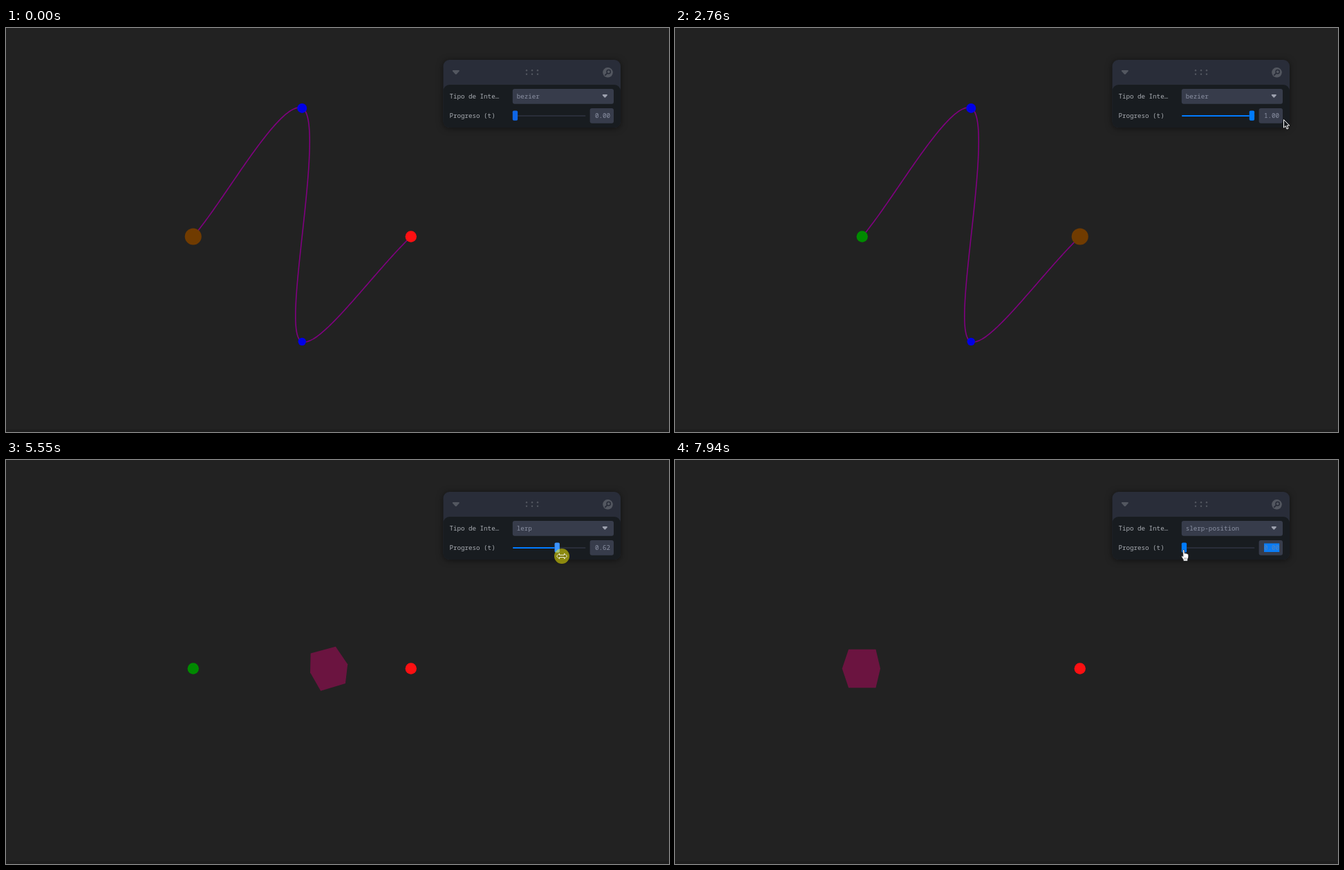
An HTML page for the animation above (8000 ms loop, 959 by 584 pixels).

```html
<!DOCTYPE html>
<html lang="es">
<head>
<meta charset="utf-8">
<title>Interpolación</title>
<style>
  html, body { margin: 0; width: 100%; height: 100%; overflow: hidden; background: #222; }
  svg { display: block; }
  text { font: 9.2px "Noto Sans Mono", "DejaVu Sans Mono", monospace; fill: #8c92a4; white-space: pre; }
  .label { fill: #a9adb3; }
  .panel { filter: drop-shadow(0 1px 5px rgba(0, 0, 0, .5)); }
</style>
</head>
<body>
<svg width="959" height="584" viewBox="0 0 959 584">
  <rect width="959" height="584" fill="#222"/>
  <rect y="580" width="959" height="4" fill="#1e1e1e"/>

  <path id="curve" fill="none" stroke="#800080" stroke-width="1.6"/>
  <g id="dots"></g>
  <circle id="ball" fill="#703b00"/>
  <polygon id="cube" fill="#6b1440"/>

  <g class="panel">
    <rect x="632.5" y="46" width="256.5" height="98" rx="9" fill="#292d39"/>
    <path d="M632.5 91a9 9 0 0 1 9-9H880a9 9 0 0 1 9 9V135a9 9 0 0 1-9 9H641.5a9 9 0 0 1-9-9Z" fill="#181c20"/>
  </g>
  <g fill="#535760">
    <path d="M646.6 61h8.4q1.4 .4 .6 1.6l-3.6 3.9q-1.200 1-2.400 0l-3.600-3.900q-.8-1.200 .6-1.600Z"/>
    <g id="grip"></g>
    <circle cx="870.5" cy="64.300" r="7.300"/>
  </g>
  <circle cx="871.700" cy="63.300" r="2.700" fill="none" stroke="#292d39" stroke-width="1.500"/>
  <path d="M869.600 65.400L866.800 68.200" stroke="#292d39" stroke-width="1.700" stroke-linecap="round"/>

  <text class="label" x="641.5" y="101.500">Tipo de Inte…</text>
  <text class="label" x="641.5" y="130">Progreso (t)</text>
  <rect x="732.800" y="88" width="146.200" height="21.700" rx="3" fill="#373c4b"/>
  <text id="mode" x="738.800" y="101.500"></text>
  <path d="M863.400 96h5.800q1.100 .4 .4 1.400l-2.400 2.900q-.9 .8-1.800 0l-2.400-2.900q-.7-1 .4-1.400Z" fill="#9da1ae"/>

  <rect x="733" y="126" width="105.500" height="2" rx="1" fill="#292d39"/>
  <rect id="fill" x="733" y="126" height="2" rx="1" fill="#007bff"/>
  <rect id="handle" y="119.500" width="7.300" height="14.200" rx="1.800"/>
  <rect x="844.600" y="116" width="34.400" height="21.700" rx="3" fill="#373c4b"/>
  <rect id="selection" x="852" y="120.500" width="22.200" height="12.500" fill="#0a7cf5"/>
  <text id="value" x="852" y="130"></text>

  <g id="arrow">
    <path d="M.5 .5V12L3.200 9.600L5 14L7 13.200L5.200 9H8.800Z" fill="#16191c" stroke="#fff" stroke-linejoin="round"/>
  </g>
  <g id="hand">
    <path d="M-1 .3Q.2-1 1.200 .3L1.700 5L3.400 4.800L5.200 5.500L6.900 6.300Q7.700 9 6.800 11.500L6 13V16H-.2V14L-2.600 10.200Q-3.200 8.300-1.600 8.500L-.5 9.600Z" fill="#fff" stroke="#16191c" stroke-width=".6"/>
    <path d="M1.700 11V14M3.700 11V14" stroke="#555" stroke-width=".6"/>
  </g>
  <g id="drag">
    <circle r="11" fill="#fff800" fill-opacity=".5"/>
    <path d="M-7.500 0L-3.500-3.800V-1.500H3.500V-3.800L7.500 0L3.500 3.800V1.500H-3.500V3.800Z" fill="#777300" stroke="#fff" stroke-width=".9"/>
  </g>
</svg>
<script>
const LOOP = 8000;
const $ = id => document.getElementById(id);
const set = (el, attrs) => { for (const k in attrs) el.setAttribute(k, attrs[k]); };
const addCircle = (parent, cx, cy, r, fill) => {
  const c = document.createElementNS('http://www.w3.org/2000/svg', 'circle');
  set(c, { cx, cy, r, ...(fill && { fill }) });
  parent.append(c);
};

// Camera at (0, 5, 5) looking at the origin
const DIST = Math.hypot(5, 5), UNIT = 78.75, CX = 428.25, CY = 301.5;
function project([x, y, z]) {
  const s = UNIT * DIST / (DIST - (y + z) * Math.SQRT1_2);
  return { x: CX + x * s, y: CY - (y - z) * Math.SQRT1_2 * s, s };
}

// Centripetal Catmull-Rom spline, walked by arc length
const pts = [[-2, 0, 0], [0, 2, -1], [0, -2, 1], [2, 0, 0]];
const dist = (a, b) => Math.hypot(...a.map((v, i) => v - b[i]));
const mirror = (a, b) => a.map((v, i) => 2 * v - b[i]);
const knots = [mirror(pts[0], pts[1]), ...pts, mirror(pts[3], pts[2])];

function spline(u) {
  const i = Math.min(2, Math.floor(u)), s = u - i;
  const [p0, p1, p2, p3] = knots.slice(i, i + 4);
  const a = Math.sqrt(dist(p0, p1)), b = Math.sqrt(dist(p1, p2)), c = Math.sqrt(dist(p2, p3));
  return p1.map((v, k) => {
    const d0 = v - p0[k], d1 = p2[k] - v, d2 = p3[k] - p2[k];
    const m1 = (d0 / a - (d0 + d1) / (a + b) + d1 / b) * b;
    const m2 = (d1 / b - (d1 + d2) / (b + c) + d2 / c) * b;
    return v + s * m1 + s * s * (3 * d1 - 2 * m1 - m2) + s ** 3 * (m1 + m2 - 2 * d1);
  });
}

const N = 240;
const path = Array.from({ length: N + 1 }, (_, i) => spline(3 * i / N));
const lengths = [0];
for (let i = 1; i <= N; i++) lengths.push(lengths[i - 1] + dist(path[i], path[i - 1]));

function pointAt(t) {
  const goal = t * lengths[N];
  const i = Math.max(1, lengths.findIndex(l => l >= goal - 1e-9));
  const f = (goal - lengths[i - 1]) / (lengths[i] - lengths[i - 1]);
  return path[i].map((v, k) => path[i - 1][k] + (v - path[i - 1][k]) * f);
}

// Outline of the cube: convex hull of its projected corners
function cubeOutline(t) {
  const c = Math.cos(Math.PI * t), s = Math.sin(Math.PI * t), h = .25, corners = [];
  for (const x of [-h, h]) for (const y of [-h, h]) for (const z of [-h, h])
    corners.push(project([4 * t - 2 + x * c + z * s, y, z * c - x * s]));
  corners.sort((a, b) => a.x - b.x || a.y - b.y);
  const half = list => {
    const out = [];
    for (const p of list) {
      while (out.length > 1) {
        const [a, b] = out.slice(-2);
        if ((b.x - a.x) * (p.y - a.y) - (b.y - a.y) * (p.x - a.x) > 0) break;
        out.pop();
      }
      out.push(p);
    }
    return out.slice(0, -1);
  };
  return [...half(corners), ...half(corners.reverse())]
    .map(p => p.x.toFixed(2) + ',' + p.y.toFixed(2)).join(' ');
}

// Screen updates: [first, last, count]
const bursts = [
  [0, 0, 1], [240, 380, 3], [580, 1070, 8], [1270, 1270, 1], [1750, 2550, 13],
  [2620, 2760, 3], [2960, 3240, 5], [3700, 3700, 1], [3890, 4590, 11], [4920, 5690, 12],
  [5760, 6260, 8], [6390, 6530, 3], [6600, 6790, 4], [7190, 7190, 1], [7390, 7940, 9]
];
function lastUpdate(t) {
  const [a, b, n] = bursts.findLast(r => r[0] <= t);
  if (n === 1) return a;
  const step = (b - a) / (n - 1);
  return a + step * Math.min(n - 1, Math.floor((t - a + 5) / step));
}

// Slider: [ms, t]
const progress = [
  [0, 0], [1690, 0], [1750, .02], [2283, .73], [2480, 1], [3699, 1], [3700, 0],
  [4920, 0], [5550, .62], [5690, .79], [5900, 1], [7189, 1], [7190, 0], [LOOP, 0]
];
// Pointer: [ms, x, y, kind]
const pointer = [
  [0, 893, 570, ''], [240, 893, 570, 'arrow'], [380, 761, 189, 'arrow'],
  [1000, 737, 131, 'hand'], [1070, 736, 125, 'hand'],
  [1270, 736, 126, 'drag'], [1690, 736, 126, 'drag'], [2283, 823, 125, 'drag'], [2550, 862, 128, 'drag'],
  [2620, 872, 130, 'arrow'], [2760, 880, 132, 'arrow'], [3170, 801, 564, 'arrow'], [3240, 801, 564, ''],
  [3890, 814, 481, 'arrow'], [4380, 736, 128, 'hand'], [4590, 736, 130, 'drag'],
  [4920, 739, 130, 'drag'], [5550, 804, 139, 'drag'], [5690, 824, 141, 'drag'], [5830, 845, 143, 'drag'],
  [6110, 854, 145, 'arrow'], [6260, 855, 145, 'arrow'], [6390, 853, 138, 'arrow'], [6530, 843, 119, 'arrow'],
  [6720, 827, 541, 'arrow'], [6790, 827, 541, ''],
  [7390, 836, 421, 'arrow'], [7870, 736, 140, 'hand'], [7940, 735.5, 130, 'hand'], [LOOP, 735.5, 130, '']
];
function sample(table, t) {
  const i = Math.max(1, table.findIndex(r => r[0] > t));
  const a = table[i - 1], b = table[i], f = (t - a[0]) / (b[0] - a[0]);
  return a.slice(1).map((v, k) => typeof v === 'number' ? v + (b[k + 1] - v) * f : v);
}

set($('curve'), { d: 'M' + path.map(project).map(p => p.x.toFixed(2) + ' ' + p.y.toFixed(2)).join('L') });
['#008a00', '#0000e6', '#0000e6', '#fc1012'].forEach((color, i) => {
  const p = project(pts[i]);
  addCircle($('dots'), p.x, p.y, p.s * (i % 3 ? .08 : .104), color);
});
for (const x of [753, 761, 769]) for (const y of [61.2, 66.8]) addCircle($('grip'), x, y, 1.2);

const show = (el, on) => { el.style.display = on ? '' : 'none'; };

function draw(ms) {
  const now = lastUpdate(ms);
  const [t] = sample(progress, now), [x, y, kind] = sample(pointer, now);
  const bezier = now < 3700, dots = $('dots').children;

  for (const el of [$('curve'), $('ball'), dots[1], dots[2]]) show(el, bezier);
  show($('cube'), !bezier);
  if (bezier) {
    const p = project(pointAt(t));
    set($('ball'), { cx: p.x, cy: p.y, r: p.s * .153 });
  } else {
    set($('cube'), { points: cubeOutline(t) });
  }

  $('mode').textContent = bezier ? 'bezier' : now < 7190 ? 'lerp' : 'slerp-position';
  $('value').textContent = t.toFixed(2);
  $('value').style.fill = now < 7190 ? '' : '#5b84b8';
  show($('selection'), now >= 7190);
  set($('fill'), { width: t * 98 });
  set($('handle'), {
    x: 732.8 + t * 98,
    fill: kind === 'drag' ? '#3c93ff' : now < 1000 ? '#0f66e6' : '#007bff'
  });

  for (const id of ['arrow', 'hand', 'drag']) show($(id), id === kind);
  if (kind) set($(kind), { transform: `translate(${x.toFixed(1)} ${y.toFixed(1)})` });
}

const start = performance.now();
function tick() {
  draw((performance.now() - start) % LOOP);
  requestAnimationFrame(tick);
}
tick();
</script>
</body>
</html>
```
